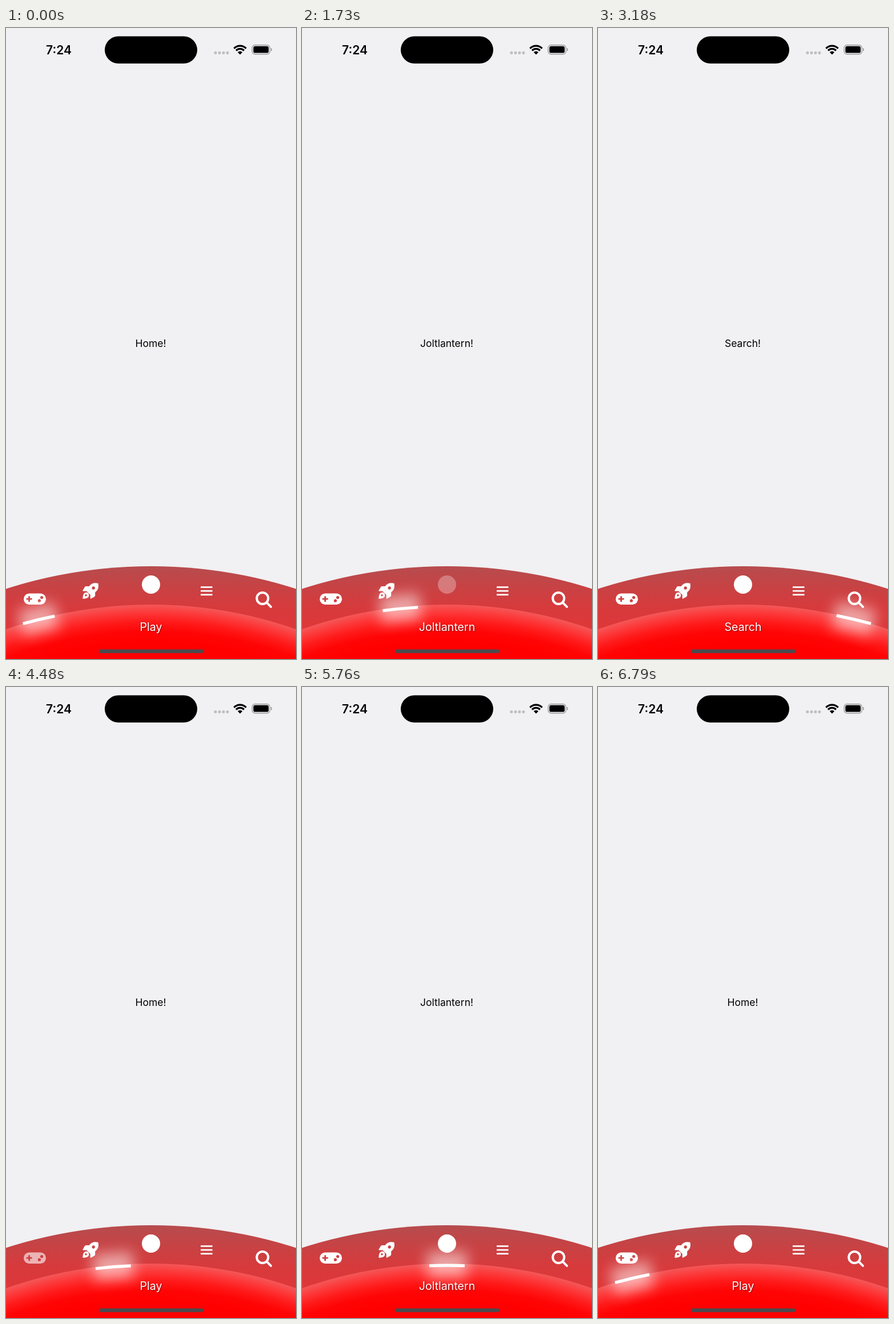
An HTML page with a canvas for the animation above (7.45 s loop, 508 by 1102 pixels).

```html
<!DOCTYPE html>
<html lang="en">
<head>
<meta charset="utf-8">
<title>Curved tab bar</title>
<style>
  html, body { margin: 0; width: 100%; height: 100%; overflow: hidden; background: #f1f0f2; }
  canvas { display: block; width: 508px; height: 1102px; }
</style>
</head>
<body>
<canvas id="stage" width="508" height="1102"></canvas>
<script>
const ctx = document.getElementById('stage').getContext('2d');
const W = 508, H = 1102, MID = 254, LOOP = 7450;
const FONT = 'Inter, Roboto, sans-serif';
const MOVE = 300, FADE_OUT = 150, FADE_IN = 250, DIM = 0.2;

const OUTER = { top: 940, r: 837 };
const INNER = { top: 1007, r: 771 };
const TRACK = { top: 1010.2, r: 850 };
const TAB_STEP = 0.1152;
const HALF = 0.0364, FIRST_HALF = 0.0334;

const tabs = [
  { label: 'Play', screen: 'Home!', draw: drawGamepad },
  { label: 'Rocket', screen: 'Rocket!', draw: drawRocket },
  { label: 'Joltlantern', screen: 'Joltlantern!', draw: drawDisc },
  { label: 'Menu', screen: 'Menu!', draw: drawMenu },
  { label: 'Search', screen: 'Search!', draw: drawSearch }
];

// press: finger down, move: indicator starts, release: finger up
const taps = [
  { tab: 1, press: 1090, move: 1125, release: 1180 },
  { tab: 2, press: 1575, move: 1645, release: 1695 },
  { tab: 3, press: 2150, move: 2180, release: 2230 },
  { tab: 4, press: 2850, move: 2880, release: 2930 },
  { tab: 0, press: 4240, move: 4303, release: 4360 },
  { tab: 2, press: 4880, move: 4907, release: 5050 },
  { tab: 4, press: 5760, move: 5805, release: 5870 },
  { tab: 0, press: 6450, move: 6490, release: 6540 }
];

const clamp = v => Math.min(1, Math.max(0, v));
const lerp = (a, b, k) => a + (b - a) * k;
const ease = v => v < 0.5 ? 2 * v * v : 1 - 2 * (1 - v) * (1 - v);
const tabAngle = i => (i - 2) * TAB_STEP;

function tapOpacity(tap, t) {
  const down = s => lerp(1, DIM, ease(clamp((s - tap.press) / FADE_OUT)));
  if (t < tap.release) return down(t);
  return lerp(down(tap.release), 1, ease(clamp((t - tap.release) / FADE_IN)));
}

function stateAt(t) {
  const state = { tab: 0, angle: tabAngle(0) - 0.003, half: FIRST_HALF, alpha: [1, 1, 1, 1, 1] };
  for (const tap of taps) {
    if (t < tap.press) break;
    state.alpha[tap.tab] = tapOpacity(tap, t);
    if (t < tap.move) break;
    const k = ease(clamp((t - tap.move) / MOVE));
    state.angle = lerp(state.angle, tabAngle(tap.tab), k);
    state.half = lerp(state.half, HALF, k);
    state.tab = tap.tab;
  }
  return state;
}

function disc(x, y, r) {
  ctx.beginPath();
  ctx.arc(x, y, r, 0, 7);
  ctx.fill();
}

function pill(x, y, w, h, r, color) {
  ctx.fillStyle = color;
  ctx.beginPath();
  ctx.roundRect(x, y, w, h, r);
  ctx.fill();
}

function text(str, x, y, font, color) {
  ctx.font = `${font} ${FONT}`;
  ctx.fillStyle = color;
  ctx.textAlign = 'center';
  ctx.fillText(str, x, y);
}

function gradient(g, stops) {
  stops.forEach(([at, color]) => g.addColorStop(at, color));
  return g;
}

function drawGamepad() {
  const p = new Path2D();
  p.roundRect(31, 987.5, 39, 19.5, 9.75);
  const plus = [[-1.4, -5], [1.4, -5], [1.4, -1.4], [5, -1.4], [5, 1.4], [1.4, 1.4],
    [1.4, 5], [-1.4, 5], [-1.4, 1.4], [-5, 1.4], [-5, -1.4], [-1.4, -1.4]];
  plus.forEach(([x, y], i) => p[i ? 'lineTo' : 'moveTo'](40.6 + x, 997.2 + y));
  p.closePath();
  for (const [x, y] of [[62.6, 994.6], [58.4, 1000.2]]) {
    p.moveTo(x + 2.6, y);
    p.arc(x, y, 2.6, 0, 7);
  }
  ctx.fill(p, 'evenodd');
}

const rocket = new Path2D('M27.2 .8C20-.8 15 .8 11.5 6H6.5C5 6 4.2 6.5 3.5 7.7L.4 13C0 14 .5 14.5 1.3 14.5H7' +
  'L13.5 21V26.7C13.5 27.5 14 28 15 27.6L20.3 24.5C21.5 23.8 22 23 22 21.5V16.5C27 13 28.7 8 27.2 .8Z' +
  'M21.7 9a2.7 2.7 0 1 1-5.4 0a2.7 2.7 0 1 1 5.4 0Z' +
  'M5 17C1.5 18 .5 22 .2 27.8C6 27.6 10 26.5 11 23C11.6 19 9 16 5 17Z' +
  'M7.6 21.8a1.8 1.8 0 1 1-3.6 0a1.8 1.8 0 1 1 3.6 0Z');

function drawRocket() {
  ctx.translate(134.2, 969);
  ctx.fill(rocket, 'evenodd');
}

function drawDisc() {
  disc(MID, 972, 16);
}

function drawMenu() {
  for (let i = 0; i < 3; i++) ctx.fillRect(341, 975.2 + i * 6.6, 20.6, 2.7);
}

function drawSearch() {
  ctx.lineWidth = 4;
  ctx.lineCap = 'round';
  ctx.beginPath();
  ctx.arc(449.3, 996, 10, Math.PI / 4, Math.PI * 2.25);
  ctx.lineTo(464, 1010.8);
  ctx.stroke();
}

function drawStatusBar() {
  text('7:24', 92.5, 45.7, '600 21px', '#000');
  pill(173, 14.5, 162, 47.5, 23.75, '#000');
  for (let i = 0; i < 4; i++) pill(364.6 + i * 7, 41, 4.6, 4.8, 1.4, '#bebdc0');

  ctx.save();
  ctx.beginPath();
  ctx.moveTo(410, 46.5);
  ctx.lineTo(394, 30.2);
  ctx.lineTo(394, 20);
  ctx.lineTo(426, 20);
  ctx.lineTo(426, 30.2);
  ctx.clip();
  ctx.strokeStyle = ctx.fillStyle = '#000';
  ctx.lineWidth = 3.3;
  for (const r of [9.3, 14.5]) {
    ctx.beginPath();
    ctx.arc(410, 45.7, r, Math.PI, 0);
    ctx.stroke();
  }
  disc(410, 45.7, 5.2);
  ctx.restore();

  ctx.strokeStyle = '#9c9b9e';
  ctx.lineWidth = 1.4;
  ctx.beginPath();
  ctx.roundRect(431.2, 29.7, 31, 16, 5);
  ctx.stroke();
  pill(433.3, 31.8, 26.8, 11.8, 3.2, '#000');
  pill(463.9, 35, 1.8, 5.4, 1, '#9c9b9e');
}

function drawBar() {
  ctx.fillStyle = gradient(ctx.createLinearGradient(0, 940, 0, 1050), [
    [0, '#b64c4e'], [0.3, '#c64345'], [0.65, '#d73a3c'], [1, '#de3739']
  ]);
  disc(MID, OUTER.top + OUTER.r, OUTER.r);

  const cy = INNER.top + INNER.r, depth = 66;
  ctx.fillStyle = gradient(ctx.createRadialGradient(MID, cy, INNER.r - depth, MID, cy, INNER.r), [
    [0, '#ff0000'], [0.3, '#ff0505'], [0.55, '#ff1a1a'], [0.8, '#fc3a3b'], [1, '#f45758']
  ]);
  disc(MID, cy, INNER.r);
}

function drawIndicator({ angle, half }) {
  const { top, r } = TRACK, width = half * r * 2;
  ctx.save();
  ctx.translate(MID, top + r);
  ctx.rotate(angle);
  ctx.filter = 'blur(12px)';
  ctx.fillStyle = 'rgba(255,255,255,.54)';
  ctx.fillRect(-width / 2 - 4, -r - 24, width + 8, 46);
  ctx.filter = 'none';
  ctx.strokeStyle = '#fff';
  ctx.lineWidth = 5.2;
  ctx.beginPath();
  ctx.arc(0, 0, r, -Math.PI / 2 - half, -Math.PI / 2 + half);
  ctx.stroke();
  ctx.restore();
}

function drawIcons(alpha) {
  tabs.forEach((tab, i) => {
    ctx.save();
    ctx.globalAlpha = alpha[i];
    ctx.fillStyle = ctx.strokeStyle = '#fff';
    tab.draw();
    ctx.restore();
  });
}

function drawLabel(label) {
  ctx.save();
  ctx.shadowColor = 'rgba(0,0,0,.45)';
  ctx.shadowBlur = 2;
  ctx.shadowOffsetX = ctx.shadowOffsetY = 1;
  text(label, MID, 1052.8, '400 19.6px', '#fff');
  ctx.restore();
}

function render() {
  const state = stateAt(performance.now() % LOOP);
  const { label, screen } = tabs[state.tab];
  ctx.fillStyle = '#f1f0f2';
  ctx.fillRect(0, 0, W, H);
  drawStatusBar();
  text(screen, 253.5, 557, '400 17.5px', '#000');
  drawBar();
  drawIndicator(state);
  drawIcons(state.alpha);
  drawLabel(label);
  pill(163, 1085.3, 182.5, 6.4, 3.2, '#4b4a4e');
  requestAnimationFrame(render);
}
render();
</script>
</body>
</html>
```
